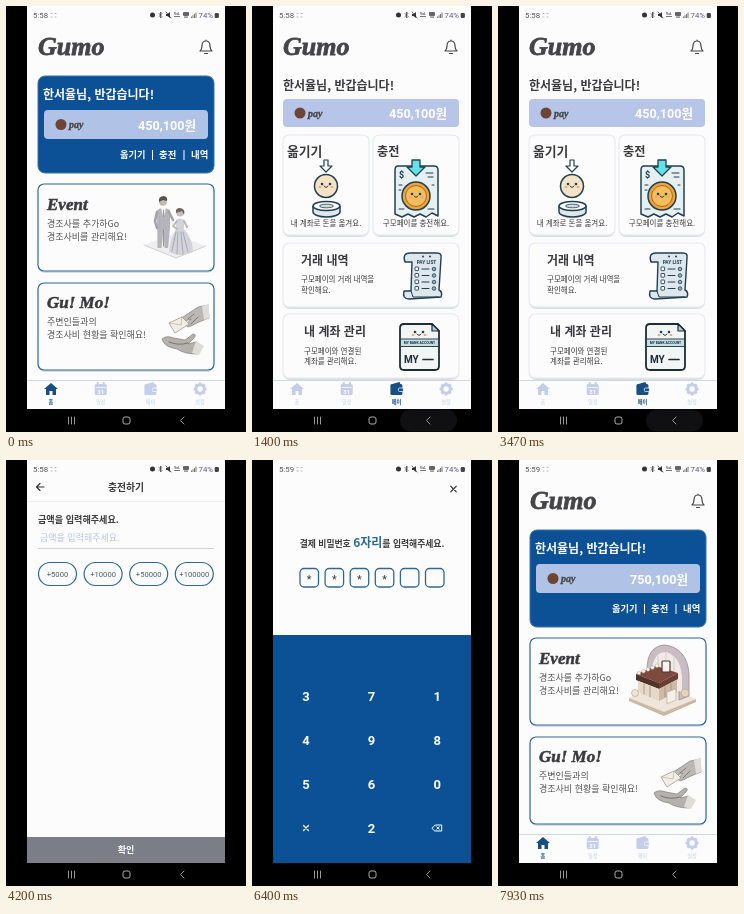
Animation of 240x426 px, one loop 8 s. Source, as an HTML page:

```html
<!DOCTYPE html>
<html lang="ko">
<head>
<meta charset="utf-8">
<title>Pay app</title>
<style>
  html, body { margin: 0; width: 100%; height: 100%; overflow: hidden; background: #000; }
  svg { display: block; width: 100vw; height: 100vh; }
  text { font-family: 'Noto Sans CJK KR', 'Noto Sans CJK', 'Noto Sans CJK JP', sans-serif; white-space: pre; }
  .num { font-family: Roboto, 'Noto Sans CJK KR', 'Noto Sans CJK', 'Noto Sans CJK JP', sans-serif; }
  .script { font-family: 'Liberation Serif', serif; font-style: italic; font-weight: 700; stroke: currentColor; stroke-width: .03em; }
  .b { font-weight: 700; }
  .line { fill: none; stroke-linecap: round; stroke-linejoin: round; }
</style>
</head>
<body>
<svg id="stage" viewBox="0 0 240 426"></svg>
<script>
const BLUE = '#0c5196', EDGE = '#2f6797', INK = '#3a3a3c', PALE = '#b7c5e8', PAPER = '#fcfcfd';
const DARK = '#20404f', SOFT = '#555';
const LOOP = 8000;

const text = (x, y, size, str, fill = INK, cls = '', anchor = 'start', extra = '') =>
  `<text x="${x}" y="${y}" font-size="${size}" fill="${fill}" color="${fill}" class="${cls}" text-anchor="${anchor}" ${extra}>${str}</text>`;
const rect = (x, y, w, h, fill, r = 0, stroke = 'none', sw = 1, extra = '') =>
  `<rect x="${x}" y="${y}" width="${w}" height="${h}" rx="${r}" fill="${fill}" stroke="${stroke}" stroke-width="${sw}" ${extra}/>`;
const circle = (x, y, r, fill, stroke = 'none', sw = 1) =>
  `<circle cx="${x}" cy="${y}" r="${r}" fill="${fill}" stroke="${stroke}" stroke-width="${sw}"/>`;
const oval = (x, y, rx, ry, fill, stroke = 'none', sw = 1) =>
  `<ellipse cx="${x}" cy="${y}" rx="${rx}" ry="${ry}" fill="${fill}" stroke="${stroke}" stroke-width="${sw}"/>`;
const shape = (d, fill, stroke = 'none', sw = 1) =>
  `<path d="${d}" fill="${fill}" stroke="${stroke}" stroke-width="${sw}" stroke-linejoin="round"/>`;
const line = (d, stroke, sw = 1) => `<path class="line" d="${d}" stroke="${stroke}" stroke-width="${sw}"/>`;
const at = (x, y, body) => `<g transform="translate(${x} ${y})">${body}</g>`;
const layer = (id, body) => `<g id="${id}">${body}</g>`;
const repeat = (n, draw) => Array.from({ length: n }, (_, i) => draw(i)).join('');

const card = (x, y, w, h, edge = EDGE) =>
  rect(x, y + 2, w, h, '#dcdde2', 7) + rect(x, y, w, h, PAPER, 6, edge, 1.2);

const balance = (x, y, w, h, fill) => rect(x, y, w, h, fill, 4) +
  circle(x + 17, y + h / 2, 5.5, '#6d4536') +
  text(x + 25, y + h / 2 + 3.5, 10, 'pay', '#444', 'script') +
  text(x + w - 12, y + h / 2 + 5, 12.6, '450,100원', '#fff', 'num b balance', 'end');

const bell = at(200, 41,
  line('M-6 4Q-4 2-4-1Q-4-6 0-6Q4-6 4-1Q4 2 6 4ZM-1.5 6.5H1.5M0-7V-6', '#444', 1.2));
const brand = text(32, 49, 26, 'Gumo', '#454548', 'script');
const back = line('M38 27H31M34 23.5L30.5 27L34 30.5', '#333', 1.2);
const header = title => back + title + rect(21, 41, 198, .7, '#e8e8ec');

function tabBar(active) {
  const icons = [
    c => shape('M-7 0L0-6L7 0H5V6H1.5V2H-1.5V6H-5V0Z', c),
    c => rect(-6, -5, 12, 11, c, 1.5) + rect(-4, -7, 2, 3, c) + rect(2, -7, 2, 3, c) +
      rect(-5, -2, 10, .8, '#fff') + text(0, 5, 6, '31', '#fff', 'num b', 'middle'),
    c => rect(-6, -5, 12, 11, c, 1.5) + shape('M-4-5L3-7L4-5Z', c) + rect(2, -1, 5, 3.5, c, 1, '#fff', .7),
    c => circle(0, 0, 4.2, 'none', c, 3) + repeat(8, i =>
      `<rect x="-1.3" y="-6.5" width="2.6" height="2.5" fill="${c}" transform="rotate(${i * 45})"/>`)
  ];
  return rect(21, 374, 198, 29, PAPER) + rect(21, 374, 198, .8, '#c4cde4') +
    ['홈', '일정', '페이', '설정'].map((name, i) => {
      const c = i === active ? '#174f82' : '#c5cee9', x = 45 + i * 49.7;
      return at(x, 383, icons[i](c)) + text(x, 398, 5.2, name, c, i === active ? 'b' : '', 'middle');
    }).join('');
}

const couple =
  shape('M138 239L167 228L200 240L170 252Z', '#eeeef0') + line('M138 239L170 252L200 240', '#d0d0d5', 1) +
  shape('M151 204Q157 200 164 204L164 222L162 242H158.5L157.5 224L155.5 242H151.5Z', '#b4b4ba') +
  line('M151 206L149 215L151 222M163 206L167 214', '#a3a3aa', 2.6) +
  shape('M155 202L157.5 212L160 202Z', '#f6f6f6') + line('M157.5 204V211M157.5 224V240', '#85858c', .8) +
  circle(157, 196, 3.8, '#c2b9b0') + shape('M153 196Q152 190 158 190Q162 191 161 195L157 194Z', '#55534f') +
  shape('M170 214Q174 211 178 214L178 223Q187 233 187 246Q174 252 163 246Q164 233 170 223Z', '#d3d3d9') +
  line('M170 226L166 245M172 226L171 248M175 226L177 248M177 226L182 246', '#a5a5ae', .9) +
  line('M171 215L167 220L171 223M178 215L181 221', '#bdb8b4', 2) +
  circle(174, 207, 3.6, '#c6beb6') + shape('M170 207Q169 202 174 202Q180 203 178 209L176 205Z', '#6b6762');

const altar =
  shape('M131 238L162 224L198 239L166 254Z', '#efe6d9') + shape('M131 238L166 252L198 239V242L166 256L131 241Z', '#c9b8a4') +
  shape('M149 210Q149 186 167 185Q189 188 191 214V236L181 240V216L149 214Z', '#c9bcc2', '#988b90', .8) +
  shape('M154 209Q156 192 168 192Q182 196 184 216V232L154 222Z', '#f0e9e8') +
  line('M160 209V197M168 211V193M176 212V198', '#cfc3c6', .8) +
  shape('M138 214L158 206L180 213L161 223Z', '#7d4a3d') + shape('M138 214L161 223V229L138 220Z', '#53322c') +
  shape('M161 223L180 213V219L161 229Z', '#693e34') +
  shape('M140 221L161 229V241L140 232Z', '#e7d9c9') + shape('M161 229L179 220V232L161 241Z', '#cdbba9') +
  line('M146 224V234M152 226V237M167 227V237M173 224V234', '#a18c7c', .8) +
  rect(164, 201, 8, 11, '#f7f2ec', 1, '#4d3a34', 1.2) +
  repeat(5, i => circle(141 + i * 4.5, 213 - i * 1.8, 1.8, '#faf4ec', '#b7a695', .5)) +
  shape('M169 232L178 229V240L169 244Z', '#f6f0e7', '#b8a796', .6) +
  circle(187, 233, 4, '#e5d3b7', '#b29c7f', .6) + circle(137, 233, 3.5, '#eee4d5', '#b29c7f', .6);

const hands =
  shape('M202 299L192 301L183 307L174 313Q173 316 177 316L185 313L180 319Q181 322 185 320L193 316L203 312Z', '#bab7b4', '#77736f', .6) +
  line('M188 308L182 313M192 311L185 318', '#6f6b67', .8) + shape('M196 300L203 298V312L198 314Z', '#deddd9') +
  shape('M163 317L176 311L183 318L169 327Z', '#f3eee3', '#a39b8c', .8) + line('M163 317L175 319L176 311', '#b9b09f', .7) +
  shape('M156 333Q160 329 168 332L179 334L187 328Q191 328 188 332L182 338L190 336L196 341L191 348Q178 348 171 343Q158 341 156 333Z', '#b5b2ae', '#77736f', .6) +
  line('M163 336Q172 340 182 337', '#716d69', .9) + shape('M190 335L198 340L193 349L186 347Z', '#dfddd9');

const home =
  brand + bell + rect(32, 70, 176, 97, BLUE, 7, '#3c72ad') +
  text(37, 93, 12, '한서율님, 반갑습니다!', '#fff', 'b') +
  balance(38, 104, 164, 29, '#b0c2e5') +
  text(114, 152, 9.2, '옮기기', '#fff', 'b') + text(153, 152, 9.4, '충전', '#fff', 'b') + text(185, 152, 9.4, '내역', '#fff', 'b') +
  rect(146, 144, 1, 10, '#fff') + rect(177.5, 144, 1, 10, '#fff') +
  card(32, 178, 176, 87) + text(41, 204, 17, 'Event', INK, 'script') +
  text(41, 221, 9, '경조사를 추가하Go', SOFT) + text(41, 234, 9, '경조사비를 관리해요!', SOFT) +
  layer('couple', couple) + layer('altar', altar) +
  card(32, 277, 176, 87) + text(41, 302, 17, 'Gu! Mo!', INK, 'script') +
  text(41, 319, 9, '주변인들과의', SOFT) + text(41, 332, 9, '경조사비 현황을 확인해요!', SOFT) +
  hands + tabBar(0);

const face = (x, y) => circle(x - 4, y, 1.3, DARK) + circle(x + 4, y, 1.3, DARK) +
  oval(x - 6, y + 3, 1.5, 1, '#f0a08a') + oval(x + 6, y + 3, 1.5, 1, '#f0a08a') +
  line(`M${x - 2} ${y + 2}Q${x} ${y + 5} ${x + 2} ${y + 2}`, DARK, 1);

const moveIcon =
  shape('M72 154H76V160H80L74 166L68 160H72Z', '#fff', DARK, 1.2) +
  circle(74, 180, 11.5, '#f6e3c6', DARK, 1.5) + face(74, 178) +
  shape('M61 200V206A13.5 5 0 0 0 88 206V200', '#dfe7ea', DARK, 1.5) + oval(74.5, 200, 13.5, 4.5, '#fff', DARK, 1.5) +
  oval(74.5, 200, 7, 1.8, '#cfdadf', DARK, .8);
const chargeIcon =
  shape('M146 160H182Q186 160 186 164V210L180 207L174 211L168 208L162 211L156 208L150 211L143 208V164Q143 160 146 160Z', '#e6f0f2', DARK, 1.5) +
  text(147, 172, 9, '$', DARK, 'num b') + line('M174 167H181M176 171H181M147 179H150M147 184H149M180 179H182M147 203H152M176 203H182', DARK, 1.1) +
  circle(164, 190, 14, '#eda63f', DARK, 1.5) + circle(164, 190, 10.5, '#f5bd5c', '#a9651f', 1) + face(164, 188) +
  shape('M160 154H168V161H173L164 170L155 161H160Z', '#66e0ea', DARK, 1.3);
const listIcon =
  shape('M158 247H185Q190 247 189 252L187 284Q191 286 189 291L157 293Q150 293 152 285H159L160 256H153Q150 247 158 247Z', '#dfe7ee', DARK, 1.4) +
  circle(171, 250.5, 1, DARK) + circle(178, 250.5, 1, DARK) +
  text(174.5, 258, 4.8, 'PAY LIST', DARK, 'num b', 'middle') +
  repeat(4, i => rect(163, 261 + i * 6.5, 3.6, 3.6, '#fff', .5, DARK, .9) +
    line(`M170 ${263 + i * 6.5}H177`, DARK, 1) + circle(182, 263 + i * 6.5, 1.8, '#93aebd', DARK, .8)) +
  line('M159 285L161 291H187', DARK, 1);
const bankIcon =
  shape('M152 318H180L187 325V360Q187 364 183 364H152Q148 364 148 360V322Q148 318 152 318Z', '#f1f5f4', '#1d2d35', 1.8) +
  shape('M180 318V325H187Z', '#b9cfd8', '#1d2d35', 1.2) + face(167, 326) +
  rect(149, 333, 37, 7, '#c5dfe8') + text(167.5, 338, 3.4, 'MY BANK ACCOUNT', '#1d2d35', 'num b', 'middle') +
  line('M149 333H186M149 340.5H186', '#1d2d35', .9) +
  text(152, 357, 10, 'MY', '#1d2d35', 'num b') + line('M171 353.5H181', '#1d2d35', 1.7);

const LIGHT = '#e7e9f0';
const pay =
  at(-1, 0, brand + bell) + text(31, 84, 12, '한서율님, 반갑습니다!', INK, 'b') + balance(31, 93, 176, 28, PALE) +
  card(31, 129, 86, 100, LIGHT) + card(121, 129, 86, 100, LIGHT) +
  text(35, 150, 12.8, '옮기기', INK, 'b') + text(125, 150, 12.2, '충전', INK, 'b') + moveIcon + chargeIcon +
  text(74, 220, 7.5, '내 계좌로 돈을 옮겨요.', INK, '', 'middle') +
  text(164, 220, 7.5, '구모페이를 충전해요.', INK, '', 'middle') +
  card(31, 237, 176, 64, LIGHT) + text(49, 259, 12, '거래 내역', INK, 'b') +
  text(49, 276, 7.5, '구모페이의 거래 내역을', INK) + text(49, 287, 7.5, '확인해요.', INK) + listIcon +
  card(31, 308, 176, 64, LIGHT) + text(52, 330, 12, '내 계좌 관리', INK, 'b') +
  text(52, 348, 7.5, '구모페이와 연결된', INK) + text(52, 358, 7.5, '계좌를 관리해요.', INK) + bankIcon +
  tabBar(2);

const deposits = [['충전', '10', '100'], ['문도겸', '10', '300000'], ['백하린', '09', '50000'], ['백하린', '09', '100000']];
const list =
  header(text(120, 31, 13, 'Pay List', INK, 'script', 'middle')) +
  text(32, 63, 9.1, '한서율님의 페이 내역', INK, 'b') + balance(32, 76, 176, 30, PALE) +
  text(76, 131, 12, '입금', EDGE, 'b', 'middle') + text(163, 131, 12, '출금', '#dadce4', 'b', 'middle') +
  rect(32, 137, 88, 1.3, EDGE) +
  deposits.map(([name, day, sum], i) => {
    const y = 153 + i * 54;
    return card(32, y, 176, 46) + text(39, y + 17, 9.1, name, INK, 'b') +
      text(201, y + 15, 7.4, '2024.10.' + day, '#777', 'num', 'end') +
      text(201, y + 33.5, 12.6, sum + '원', EDGE, 'num b', 'end');
  }).join('') + tabBar(2);

const charge =
  header(text(120, 31, 9.8, '충전하기', INK, 'b', 'middle')) +
  text(32, 63, 9.1, '금액을 입력해주세요.', INK, 'b') +
  text(34, 81, 9, '', PALE, '', 'start', 'id="amount"') + rect(32, 88, 176, .8, '#c9cbc9') +
  ['5000', '10000', '50000', '100000'].map((n, i) => {
    const x = 32.5 + i * 45.6;
    return rect(x, 102.5, 38, 23, PAPER, 11.5, EDGE, 1.2, 'class="pill"') +
      text(x + 19, 117, 7.6, '+' + n, '#4a5968', 'num', 'middle');
  }).join('') +
  rect(21, 377, 198, 26, BLUE, 0, 'none', 0, 'id="confirm"') + text(120, 393, 9, '확인', '#fff', 'b', 'middle');

const KEYS = '371498560x2<';
const keyX = i => 54 + (i % 3) * 65.6, keyY = i => 236 + Math.floor(i / 3) * 44;
const glyphs = {
  'x': line('M-2.5-2.5L2.5 2.5M2.5-2.5L-2.5 2.5', '#fff', 1.3),
  '<': line('M-5 0L-2-3H4.5V3H-2ZM-.5-1.3L2 1.3M2-1.3L-.5 1.3', '#fff', 1)
};
const pin =
  line('M198.8 26.3L204.2 31.7M204.2 26.3L198.8 31.7', '#444', 1.3) +
  text(120, 87, 8.8, `결제 비밀번호 <tspan font-size="12" fill="${EDGE}">6자리</tspan>를 입력해주세요.`, INK, 'b', 'middle') +
  repeat(6, i => rect(48 + i * 25.1, 108.5, 18.5, 18.5, PAPER, 4, EDGE, 1.3) +
    text(57.2 + i * 25.1, 123, 11, '*', INK, 'num star', 'middle')) +
  rect(21, 175, 198, 228, BLUE) + rect(0, 0, 66, 44, PALE, 0, 'none', 0, 'id="press"') +
  [...KEYS].map((key, i) =>
    at(keyX(i), keyY(i), glyphs[key] || text(0, 5, 13, key, '#fff', 'num b', 'middle'))).join('');

const status =
  text(27, 11.5, 7.8, '5:58', SOFT, 'num', 'start', 'id="clock"') + line('M45 7.5H46M49 7.5H50M45 11H46M49 11H50', '#999', .7) +
  circle(146.5, 9, 2.5, '#333') + line('M153 7.5L156 10.5L154.5 12V6L156 7.5L153 10.5', '#444', .8) +
  shape('M160 8H161.5L164 6V12L161.5 10H160Z', '#333') + line('M160 6L165 12', '#333', .8) +
  text(168, 9, 3.4, 'VoL', SOFT, 'num b') + rect(168, 10, 6, 1, '#777') +
  rect(177, 6, 6, 4, '#666', 1) + rect(178, 10.5, 4, 1.2, '#777') +
  repeat(4, i => rect(185 + i * 1.5, 10.5 - i * 1.3, 1, 1.5 + i * 1.3, '#777')) +
  text(192.5, 11.5, 7.8, '74%', '#5d5a80', 'num') + rect(208.7, 7, 4.2, 5, '#444', 1.2);

const nav = rect(148, 403.5, 57, 22, '#100f12', 11, 'none', 0, 'id="ripple"') +
  line('M62.5 411V418M65.5 411V418M68.5 411V418M178 411L174.5 414.5L178 418', '#999', 1) +
  rect(117, 411, 7, 7, 'none', 2, '#aaa');

const screens = { home, pay, list, charge, pin };
document.getElementById('stage').innerHTML =
  rect(0, 0, 240, 426, '#000') + rect(21, 0, 198, 403, PAPER) +
  Object.entries(screens).map(([id, body]) => layer(id, body)).join('') + status + nav;

const SCENES = [[0, 'home'], [600, 'pay'], [2130, 'list'], [3470, 'pay'], [3930, 'charge'], [5130, 'pin'], [7070, 'pay'], [7600, 'home']];
const ADDS = [4470, 4630, 4800];
const PRESSES = [[5460, '9'], [5720, '3'], [5950, '7'], [6180, '1'], [6500, '5'], [6750, '0']];
const BACKS = [1300, 3400];

const $ = id => document.getElementById(id);
const all = cls => [...document.getElementsByClassName(cls)];
const show = (el, on) => { el.style.display = on ? '' : 'none'; };
const within = (t, start, span) => t >= start && t < start + span;
const stars = all('star'), balances = all('balance'), pills = all('pill');

function draw(t) {
  const scene = SCENES.filter(([start]) => t >= start).pop()[1];
  for (const id in screens) show($(id), id === scene);
  const paid = t >= 7000;
  show($('couple'), !paid);
  show($('altar'), paid);
  balances.forEach(el => { el.textContent = paid ? '750,100원' : '450,100원'; });
  $('clock').textContent = t < 6000 ? '5:58' : '5:59';

  const adds = ADDS.filter(start => t >= start).length;
  $('amount').textContent = adds ? adds * 100000 : '금액을 입력해주세요.';
  $('amount').setAttribute('fill', adds ? INK : PALE);
  $('confirm').setAttribute('fill', adds ? BLUE : '#7b7e87');
  pills[3].setAttribute('fill', ADDS.some(start => within(t, start, 90)) ? PALE : PAPER);

  const typed = PRESSES.filter(([start]) => t >= start).length;
  stars.forEach((el, i) => show(el, i < typed));
  const held = PRESSES.find(([start]) => within(t, start, 150));
  show($('press'), held);
  if (held) {
    const i = KEYS.indexOf(held[1]);
    $('press').setAttribute('x', keyX(i) - 33);
    $('press').setAttribute('y', keyY(i) - 22);
  }
  const tap = BACKS.find(start => within(t, start, 400));
  $('ripple').style.opacity = tap === undefined ? 0 : Math.min(1, (400 - (t - tap)) / 250);
}

const started = performance.now();
function tick() {
  draw((performance.now() - started) % LOOP);
  requestAnimationFrame(tick);
}
tick();
</script>
</body>
</html>
```
